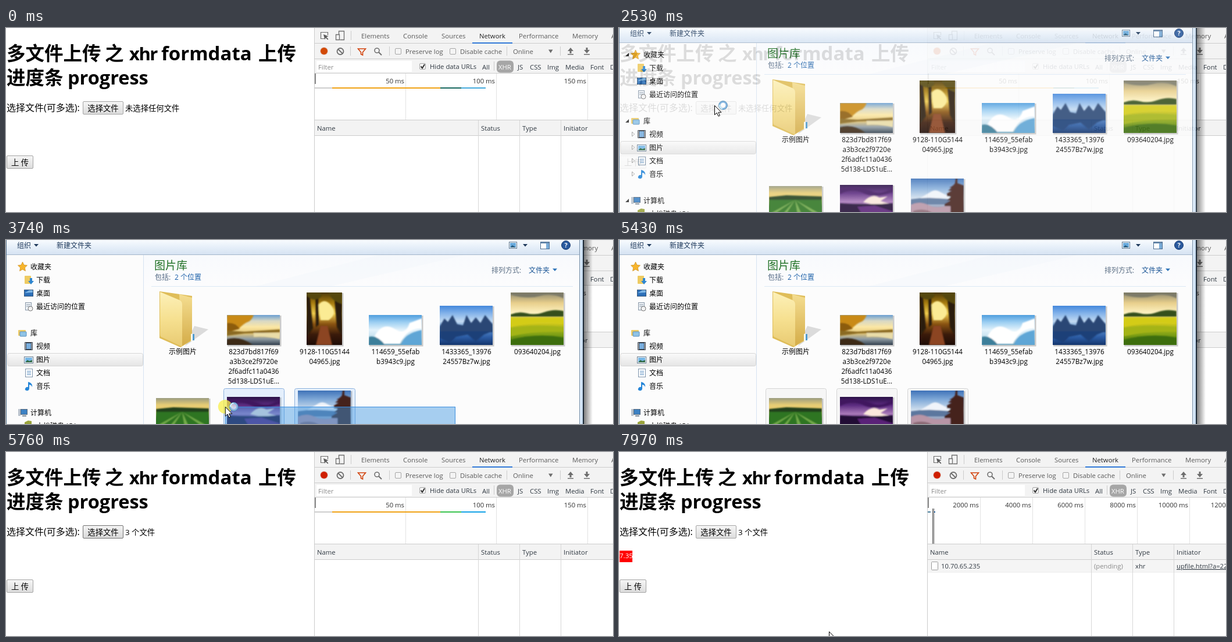
An HTML page for the animation above (8 s loop, 1044 by 319 pixels).

```html
<!DOCTYPE html>
<html lang="zh-CN">
<head>
<meta charset="utf-8">
<title>多文件上传</title>
<style>
html, body { margin: 0; width: 1044px; height: 319px; overflow: hidden; background: #fff }
svg { display: block }
text { font-family: "Open Sans", "Noto Sans CJK SC", "Noto Sans CJK", sans-serif; white-space: pre }
#stage { --rec: #d24a08; --wait: #14655c; --load: #42a9dc }
#stage.fresh { --rec: #cf1f00; --wait: #35c24c; --load: #0fa0e6 }
.btn rect { fill: url(#face); stroke: #a3a3a3 }
.btn.hover rect { fill: url(#faceHover); stroke: #707070 }
.btn.press rect { fill: #d8d8d8; stroke: #606060 }
.pick { fill: #e4effc; stroke: #8db2de }
.blur .pick { fill: #f6f6f6; stroke: #d4d4d4 }
</style>
</head>
<body>
<svg id="stage" width="1044" height="319" viewBox="0 0 1044 319"></svg>
<script>
const stage = document.getElementById('stage');
const $ = id => document.getElementById(id);

// Markup helpers
const text = (x, y, s, size = 12, fill = '#000', more = '') =>
  `<text x="${x}" y="${y}" font-size="${size}" fill="${fill}" ${more}>${s}</text>`;
const box = (x, y, w, h, fill, more = '') =>
  `<rect x="${x}" y="${y}" width="${w}" height="${h}" fill="${fill}" ${more}/>`;
const path = (d, fill, more = '') => `<path d="${d}" fill="${fill}" ${more}/>`;
const line = (d, stroke, width = 1) => path(d, 'none', `stroke="${stroke}" stroke-width="${width}"`);
const disc = (x, y, r, fill, more = '') => `<circle cx="${x}" cy="${y}" r="${r}" fill="${fill}" ${more}/>`;
const group = (id, ...parts) => `<g id="${id}">${parts.join('')}</g>`;
const grad = (id, colors, dir = 'x2="0" y2="1"') => `<linearGradient id="${id}" ${dir}>` +
  colors.map((c, i) => `<stop offset="${i / (colors.length - 1)}" stop-color="${c}"/>`).join('') + '</linearGradient>';
const caret = (x, y, fill) => path(`M${x - 4} ${y - 2}h8l-4 4.5z`, fill);
const ui = (x, y, s, fill = '#303942', more) => text(x, y, s, 11.3, fill, more);
const title = (x, y, s, size = 32.5, more = '') => text(x, y, s, size, '#000', 'font-weight="700" ' + more);

const button = (id, x, y, w, label) => `<g id="${id}" class="btn">` +
  box(x + .5, y + .5, w - 1, 22, '', 'rx="1.5"') +
  text(x + w / 2, y + 16.5, label, 13.33, '#000', 'text-anchor="middle"') + '</g>';

function page() {
  return [
    title(1, 56, '多文件上传'), title(170, 56, '之'), title(212, 56, 'xhr', 31, 'letter-spacing="-1.5"'),
    title(267, 56, 'formdata', 33), title(434, 56, '上传'),
    title(1, 98, '进度条'), title(106, 98, 'progress'),
    text(1, 144, '选择文件(可多选):', 16),
    button('choose', 132, 127, 70, '选择文件'),
    text(205, 143.5, '', 13.33, '#000', 'id="chosen"'),
    group('progress', box(1, 171, 22, 20, '#f00'), text(1, 184, '7.35%', 11.5, '#fff')),
    button('upload', 1, 221, 46, '上 传')
  ].join('');
}

const tick = (x, label) => line(`M${x + .5} 79V159`, '#e2e2e2') +
  ui(x - 2, 96, label, '#303030', 'text-anchor="end"');
const check = (x, y, on) => box(x + .5, y + .5, 10, 10, '#f4f4f4', 'rx="1.5" stroke="#a5a5a5"') +
  (on ? line(`M${x + 2.5} ${y + 5.5}l2.5 3 4-6.5`, '#333', 2) : '');
const sep = (x, y) => line(`M${x + .5} ${y}v16`, '#ccc');

function devtools() {
  const tabs = [[611, 'Elements'], [683, 'Console'], [749, 'Sources'], [814, 'Network'],
    [882, 'Performance'], [974, 'Memory'], [1041, 'Application']];
  const kinds = [[819, 'All'], [880, 'JS'], [901, 'CSS'], [931, 'Img'], [962, 'Media'], [1005, 'Font'], [1039, 'Doc']];
  const heads = [[535, 'Name'], [817, 'Status'], [888, 'Type'], [959, 'Initiator']];
  return [
    box(530, 0, 514, 319, '#fff'), box(531, 0, 513, 79, '#f3f3f3'), box(531, 160, 513, 27, '#f3f3f3'),
    ...[26, 53, 78, 159, 186].map(y => line(`M531 ${y + .5}H1044`, '#ccc')),
    // tab strip
    line('M548 18.5h-6.5v-11h12v5', '#6e6e6e', 1.2), path('M546 11l8.5 3.5-3.5 1.3 3.4 3.4-1.2 1.2-3.4-3.4-1.5 3z', '#5a5a5a'),
    line('M572.5 11V5.5h9v15h-7M567.5 11.5h6v9h-6z', '#6e6e6e', 1.3), sep(593, 5),
    ...tabs.map(([x, s]) => ui(x, 18, s, s === 'Network' ? '#222' : '#5a5a5a')),
    box(802, 25, 69, 2, '#2f77d8'),
    // tool row
    disc(547, 40, 7, '#e3c9c0'), disc(547, 40, 6, 'var(--rec)'),
    disc(575, 40.5, 5.5, 'none', 'stroke="#6e6e6e" stroke-width="1.8"'), line('M571 36.5l8 8', '#6e6e6e', 1.8),
    sep(592, 32), path('M605.5 36h13l-5 6v5l-3-1.5v-3.5z', 'none', 'stroke="#d2420c" stroke-width="1.6"'),
    disc(638, 39, 4, 'none', 'stroke="#6e6e6e" stroke-width="1.6"'), line('M641 42l5 5', '#6e6e6e', 2), sep(659, 32),
    check(669, 35), ui(687, 45, 'Preserve log', '#5a5a5a'), check(763, 35), ui(781, 45, 'Disable cache', '#5a5a5a'),
    sep(861, 32), ui(872, 45, 'Online', '#5a5a5a'), path('M933 37.5h7.5l-3.75 6z', '#6e6e6e'), sep(953, 32),
    path('M971 34l5 6h-3.5v4h-3v-4H966zM966 45h10v1.5h-10z', '#6e6e6e'),
    path('M999 44l5-6h-3.5v-4h-3v4H994zM994 45h10v1.5h-10z', '#6e6e6e'),
    // filter row
    box(534, 57, 164, 19, '#fff'), ui(537, 72, 'Filter', '#8a8a8a'), check(711, 61, true), ui(729, 71, 'Hide data URLs'),
    sep(839, 58), box(844, 56.5, 29, 21, '#a6a6a6', 'rx="6"'), ui(847, 72, 'XHR', '#fff'),
    ...kinds.map(([x, s]) => ui(x, 72, s)),
    ...heads.map(([x, s]) => ui(x, 178, s)),
    group('idleNet', tick(687, '50 ms'), tick(843, '100 ms'), tick(1000, '150 ms'),
      box(531, 103, 30, 2, '#ccc'), box(561, 103, 186, 2, '#f0a010'),
      box(747, 103, 36, 2, 'var(--wait)'), box(783, 103, 42, 2, 'var(--load)')),
    group('busyNet', ...[1, 2, 3, 4, 5, 6].map(i => tick(531 + 90 * i, 2000 * i + ' ms')),
      box(531, 103, 5, 2, '#4a7f9c'), box(542, 103, 2, 2, '#2f6fb0'),
      line('M539.5 98V159M541.5 98V159', '#444'),
      box(531, 187, 513, 21, '#f5f5f5'), line('M531 208.5H1044', '#ececec'),
      box(537.5, 190.5, 11, 14, '#fff', 'rx="1" stroke="#999"'),
      ui(554, 202, '10.70.65.235'), ui(817, 202, '(pending)', '#8a8a8a'), ui(888, 202, 'xhr'),
      ui(959, 202, 'upfile.html?a=222', '#303942', 'text-decoration="underline"')),
    box(531, 79, 2, 18, '#888'),
    line('M812.5 160V319M883.5 160V319M954.5 160V319', '#d6d6d6'),
    line('M530.5 0V319', '#ccc')
  ].join('');
}

// A soft landscape: a vertical gradient with a few blurred shapes
function photo(id, x, y, w, h, colors, ...shapes) {
  return box(x + 1, y + 1, w + 1.5, h + 1.5, '#0003') + grad(id, colors) +
    `<svg x="${x}" y="${y}" width="${w}" height="${h}">` + box(0, 0, w, h, `url(#${id})`) +
    '<g filter="url(#soft)">' + shapes.map(([d, c]) => path(d, c)).join('') + '</g></svg>';
}

const caption = (x, s) => s.split(' ').map((part, i) =>
  text(x, 198 + 17 * i, part, /[一-龥]/.test(s) ? 12 : 11.7, '#000', 'text-anchor="middle"')).join('');

function photos() {
  return [
    path('M308 184l40-29-24-6z', '#0002'), path('M264 89l56 8v77l-20 12-36-16z', '#dfbd58'),
    path('M298 94l22 6v72l-18 12z', 'url(#flap)'),
    path('M265 90l33 14q5 2 5 8v73l-36-17q-2-1-2-4z', 'url(#folder)'),
    path('M318 163h6v11h-6z', '#4f9bd0'), path('M318 163l3-1v13l-3 1z', '#f8f8f0'), caption(304, '示例图片'),
    photo('autumn', 380, 130, 91, 52, ['#6a9fd2', '#d8d8c4', '#fbe7a4', '#e6c878', '#8d9aa2', '#33404e'],
      ['M0 0H46Q42 10 36 12T20 24L0 30z', '#c98a14'], ['M0 14q14-2 22 10L0 30z', '#8c5c10'],
      ['M0 27l30 2 61-4v5l-60 2-31 4z', '#8a6a20'], ['M46 31H91V42Q66 36 46 38z', '#e9dca8'],
      ['M0 42q24-6 44 10H0z', '#3c2c14']),
    caption(426, '823d7bd817f69 a3b3ce2f9720e 2f6adfc11a0436 5d138-LDS1uE...'),
    photo('forest', 517, 91, 61, 91, ['#4a3808', '#a87c10', '#eecb4c', '#8a5412', '#3a1a0a', '#1e0c06'],
      ['M20 22q10-14 22 0t-4 26H24z', '#fbeb94'], ['M0 0h5l6 62-11 16zM15 0h5l1 56-5 4zM47 0h14v76l-9-16z', '#2a1c08'],
      ['M0 6Q16 18 26 6L24 0H0zM61 20Q42 14 38 0H61z', '#54470c'], ['M24 58h12l8 33H16z', '#8c4420']),
    caption(548, '9128-110G5144 04965.jpg'),
    photo('wave', 624, 130, 91, 52, ['#4f9ede', '#9fd0f2', '#e2f2fb', '#c4e0ee', '#5f9cb8'],
      ['M10 36Q24 12 44 24T70 14L91 6V24Q66 22 54 50H26z', '#fff'], ['M56 52Q60 32 91 26V52z', '#5fa6d6'],
      ['M0 38q14-4 28 14H0z', '#3c7f9a']),
    caption(670, '114659_55efab b3943c9.jpg'),
    photo('lake', 746, 114, 91, 68, ['#4488dc', '#86b4ea', '#c2daf2', '#5a8cca', '#2c5ca4', '#14356c'],
      ['M0 36l8-14 6 6 8-12 8 16 10 2 6-18 8 14 8-10 8 10 8-14 13 16v14H0z', '#2a4774'],
      ['M0 44H91L76 50 62 62 48 50 28 54 18 64 0 56z', '#1f4078']),
    caption(792, '1433365_13976 24557Bz7w.jpg'),
    photo('rape', 868, 91, 91, 91, ['#8f8a70', '#e8cf8c', '#fff4c4', '#c9c41c', '#7fa016', '#3f700c'],
      ['M0 4q30 8 50 2t41 4V0H0z', '#7c7a68'], ['M0 38q14-6 28-2t30-2 33-2v10H0z', '#34501a'],
      ['M0 43H91v12Q40 50 0 60z', '#d4cc14'], ['M0 62q40-8 91-2v8Q40 66 0 76z', '#a4b416'],
      ['M0 82q44-12 91-4V91H0z', '#3c6e10']),
    caption(914, '093640204.jpg'),
    photo('field', 258, 274, 91, 60, ['#9a9c80', '#e6cc74', '#f0d070', '#3c7424', '#2c6a1a', '#2a641a'],
      ['M0 19l30-3 61 2v7H0z', '#22401a'], ['M0 24H91V60H0z', '#2e7420'],
      ['M45 24L-20 60h12zM45 24L14 60h8zM45 24l6 36h10zM45 24l50 36h14z', '#74ae4c']),
    photo('dusk', 380, 272, 91, 58, ['#2a1046', '#5c2c80', '#a878b8', '#4a2068', '#1c0c2c'],
      ['M0 6q30-6 52 4t39-8v10Q60 24 40 14T0 16z', '#40185e'], ['M40 30q14-16 28-8l14-2-12 8 14 4-26 2z', '#fbe8dc'],
      ['M0 32q44 3 91 0v26H0z', '#200e34'], ['M30 38l30-2 31 10v8H40z', '#5a2478']),
    photo('pagoda', 502, 261, 91, 68, ['#3f72b8', '#86aeda', '#d2e0ee', '#8c9ab8', '#8a7080'],
      ['M16 34l20-12q6-3 12 0l22 12z', '#f0f4fa'], ['M0 36q30-5 66 0v9H0z', '#5c779e'],
      ['M0 46q14-8 30 0t40-2V68H0z', '#b895a6'], ['M4 56q20-6 34 4t26-2v10H4z', '#8c6a76'],
      ['M77 0h3v8l11 4v4H66q8-4 10-8zM70 16h21v5H64zM62 26l8-5h21v10H62zM69 31h22v7H62zM58 44l10-6h23v10H58zM68 48h23v20H68z', '#44201c'])
  ].join('');
}

const library = (x, y) => box(x, y - 5, 13, 10, '#edcb66', 'rx="1"') + box(x + 3, y - 2, 11, 8, '#8fc3e6', 'rx="1" stroke="#5a8fbd"');
function nav() {
  const rows = [[42, 46, '收藏夹'], [52, 69, '下载'], [52, 92, '桌面'], [52, 115, '最近访问的位置'], [42, 161, '库'],
    [52, 184, '视频'], [52, 207, '图片'], [52, 230, '文档'], [52, 253, '音乐'], [42, 299, '计算机'], [52, 322, '本地磁盘 (C:)']];
  return [
    box(2.5, 196.5, 233, 22, 'url(#row)', 'rx="3" stroke="#d6d6d6"'),
    ...rows.map(([x, y, s]) => text(x, y + 4.7, s)),
    path('M28.5 38l2.4 5.3 5.6.7-4.1 4 1 5.7-4.9-2.8-4.9 2.8 1-5.7-4.1-4 5.6-.7z', '#f7b52c', 'stroke="#c98a1c" stroke-width=".7"'),
    box(32, 62, 11, 14, '#eecb62', 'rx="1"'), path('M41 66h4v5h3l-5 6-5-6h3z', '#2f86d0'),
    box(31.5, 86.5, 15, 11, '#2c6fb8', 'stroke="#34567a"'), path('M32 92l8-5h6v4z', '#7cb4e4'),
    box(33.5, 108.5, 10, 13, '#eef2f6', 'stroke="#8796a6"'), line('M35 112h7M35 115h7', '#8796a6'), disc(42, 119, 4, '#f3f3f3', 'stroke="#777"'),
    library(21, 161),
    box(32, 177, 14, 14, '#333c48', 'rx="1"'), box(35, 179, 8, 10, '#79aede'), line('M33.5 178v12M44.5 178v12', '#ddd'),
    box(31.5, 202.5, 15, 11, '#fff', 'stroke="#667c92"'), path('M33 204h12v8H33z', '#75b6e6'), path('M33 212l4-4 3 2 5-2v4z', '#2d6844'),
    box(33.5, 223.5, 12, 14, '#fff', 'stroke="#7d93aa"'), line('M36 227.5h7M36 230.5h7M36 233.5h7', '#4b84bb'),
    path('M38 246l3 1q5 3 4 8-1-4-5-4v7q-1 4-5 3t-1-5q2-2 4-1z', '#2686d8'),
    box(25.5, 293.5, 11, 9, '#3d82c4', 'stroke="#586a7c"'), box(21, 293, 4, 12, '#b9c2cc'), box(28, 304, 7, 2, '#7f8c99'),
    path('M32 316l6-3 6 1v5H32z', '#9ba43c'),
    group('twisties', ...[46, 161, 299].map(y => path(`M17 ${y - 3}v6h-6z`, '#333')),
      ...[184, 207, 230, 253].map(y => path(`M22.5 ${y - 4}v8l4-4z`, '#fff', 'stroke="#9a9a9a"')))
  ].join('');
}

function dialog() {
  return [
    box(993, 0, 16, 319, 'url(#shade)'), box(0, 0, 994, 319, '#fcfcfc'),
    box(237, 26, 748, 55, 'url(#head)'), path('M640 26h150L560 80H430z', '#f3f7fb', 'opacity=".5"'),
    box(0, 0, 986, 25, 'url(#bar)'), line('M0 25.5H986', '#a3b5ca'),
    text(19, 14, '组织', 12, '#1e395b'), caret(52, 9, '#1e395b'), text(87, 14, '新建文件夹', 12, '#1e395b'),
    box(865.5, 3.5, 13, 11, '#fff', 'stroke="#5f7890"'), box(867, 5, 10, 8, '#67a9dc'), path('M867 13l4-4 6 4z', '#2c5f80'),
    caret(893, 9, '#1e395b'),
    box(919.5, 3.5, 15, 12, '#fff', 'stroke="#4c6d90"'), box(929, 4, 5, 11, '#79acd8'), box(920, 4, 14, 2, '#6b8db0'),
    disc(963, 9, 7.5, '#2a5a9e', 'stroke="#183a70"'), text(963, 13, '?', 11, '#fff', 'text-anchor="middle" font-weight="700"'),
    line('M236.5 26V319', '#d6e3f1'), nav(),
    text(255, 50.5, '图片库', 19, '#1f7024'), text(256, 69, '包括:', 12, '#4e6580'), text(290, 69, '2 个位置', 12, '#1a5fa8'),
    text(835, 57, '排列方式:', 12, '#5c6f85'), text(899, 57, '文件夹', 12, '#1a5596'), caret(944, 51.5, '#2b72b8'),
    line('M250 80.5H975', '#dbe8f5'),
    group('picks', ...[252, 374, 496].map(x => box(x + .5, 257.5, 104, 100, '', 'rx="3" class="pick"'))),
    photos(),
    box(0, 0, 0, 60, '#3d94e073', 'id="band" stroke="#3b8ede"'),
    line('M.5 0V319', '#56738f'), box(986, 0, 7, 319, '#cfe2f5'), line('M986.5 0V319', '#6f8aa6'),
    line('M987.5 0V319', '#eef6fd'), line('M993 0V319', '#1c2a38', 2)
  ].join('');
}

const ring = (id, x, r, w, color) => `<g id="${id}" transform="translate(${x} 0)">` +
  disc(0, 0, r, '#ffffffb0', `stroke="${color}" stroke-width="${w}"`) +
  disc(0, 0, r + w / 2, 'none', 'stroke="#3d7ba6" stroke-width=".7"') +
  `<path class="spin" d="M0 ${-r}A${r} ${r} 0 0 1 ${r} 0" fill="none" stroke="#d5f2fa" stroke-width="${w * .7}"/></g>`;

const pointer = group('pointer',
  disc(0, 0, 12, '#f8ef4a', 'id="halo" opacity=".75"'),
  path('M.5.5V16.5l3.8-3.5 2.7 6 2.5-1.1-2.6-5.7H12z', '#fff', 'id="arrow" stroke="#000"'),
  ring('wait', 0, 7.5, 4, '#45a9c4'), ring('work', 15, 6, 3, '#86b6e0'));

stage.innerHTML = '<defs><filter id="soft"><feGaussianBlur stdDeviation="1.3"/></filter>' +
  grad('face', ['#f6f6f6', '#dcdcdc']) + grad('faceHover', ['#f4f4f4', '#d8d8d8']) +
  grad('bar', ['#f8fbfe', '#e6eff9', '#d6e3f2']) + grad('head', ['#f8fafd', '#fcfcfd']) + grad('row', ['#fafafa', '#e5e5e5']) +
  grad('folder', ['#fcf0b8', '#f6e090', '#e8ca72']) + grad('flap', ['#f4dd90', '#d4ac48']) +
  grad('shade', ['#00000088', '#0000'], 'x2="1" y2="0"') + '</defs>' +
  page() + devtools() + group('dialog', dialog()) + pointer;

// Time, x, y of the pointer
const route = [[210, 301, 262], [640, 164, 134], [2700, 164, 134], [2900, 330, 215], [3070, 640, 340],
  [3400, 773, 345], [3740, 377, 289], [3900, 340, 287], [4030, 300, 286], [4130, 262, 285], [4270, 390, 345],
  [6140, 349, 312], [6800, 30, 230], [7700, 30, 230], [7970, 361, 311]];
const ramp = (t, a, b) => Math.min(1, Math.max(0, (t - a) / (b - a)));
const within = (t, a, b) => t >= a && t < b;
const show = (id, on) => $(id).style.display = on ? '' : 'none';

function locate(t) {
  const i = Math.max(1, route.findIndex(p => p[0] > t));
  const [a, b] = t >= 7970 ? route.slice(-2) : [route[i - 1], route[i]];
  const k = ramp(t, a[0], b[0]);
  return [a[1] + (b[1] - a[1]) * k, a[2] + (b[2] - a[2]) * k];
}

function draw(t) {
  const [x, y] = locate(t);
  const dragging = within(t, 3400, 4130), busy = t >= 7230;

  stage.classList.toggle('fresh', t >= 5430);
  $('chosen').textContent = t < 5430 ? '未选择任何文件' : '3 个文件';
  $('choose').setAttribute('class', 'btn' + (within(t, 540, 5970) ? ' hover' : ''));
  $('upload').setAttribute('class', 'btn' + (within(t, 6950, 7120) ? ' press' : within(t, 6740, 7750) ? ' hover' : ''));
  show('progress', t >= 7120);
  show('idleNet', !busy);
  show('busyNet', busy);

  const shown = ramp(t, 2330, 2560) * (1 - ramp(t, 5480, 5740));
  show('dialog', shown > 0);
  $('dialog').style.opacity = shown;
  $('twisties').style.opacity = 1 - ramp(t, 3150, 3650);
  $('picks').setAttribute('class', t >= 5430 ? 'blur' : '');
  [356, 478, 600].forEach((right, i) => $('picks').children[i].style.display =
    t >= 4130 || dragging && y < 319 && x < right ? '' : 'none');
  show('band', dragging);
  if (dragging) {
    $('band').setAttribute('x', x + .5);
    $('band').setAttribute('y', y + .5);
    $('band').setAttribute('width', Math.max(0, 772 - x));
  }

  const waiting = within(t, 2110, 2360);
  show('pointer', within(t, 210, 4270) || t >= 6140);
  $('pointer').setAttribute('transform', `translate(${x} ${y})`);
  show('halo', within(t, 900, 1000) || dragging);
  show('arrow', !waiting);
  show('wait', waiting);
  show('work', within(t, 1150, 1290) || within(t, 1600, 1700) || within(t, 2360, 4270));
  document.querySelectorAll('.spin').forEach(s => s.setAttribute('transform', `rotate(${t * .36 % 360})`));
}

const start = performance.now();
function frame() {
  draw((performance.now() - start) % 8000);
  requestAnimationFrame(frame);
}
frame();
</script>
</body>
</html>
```
